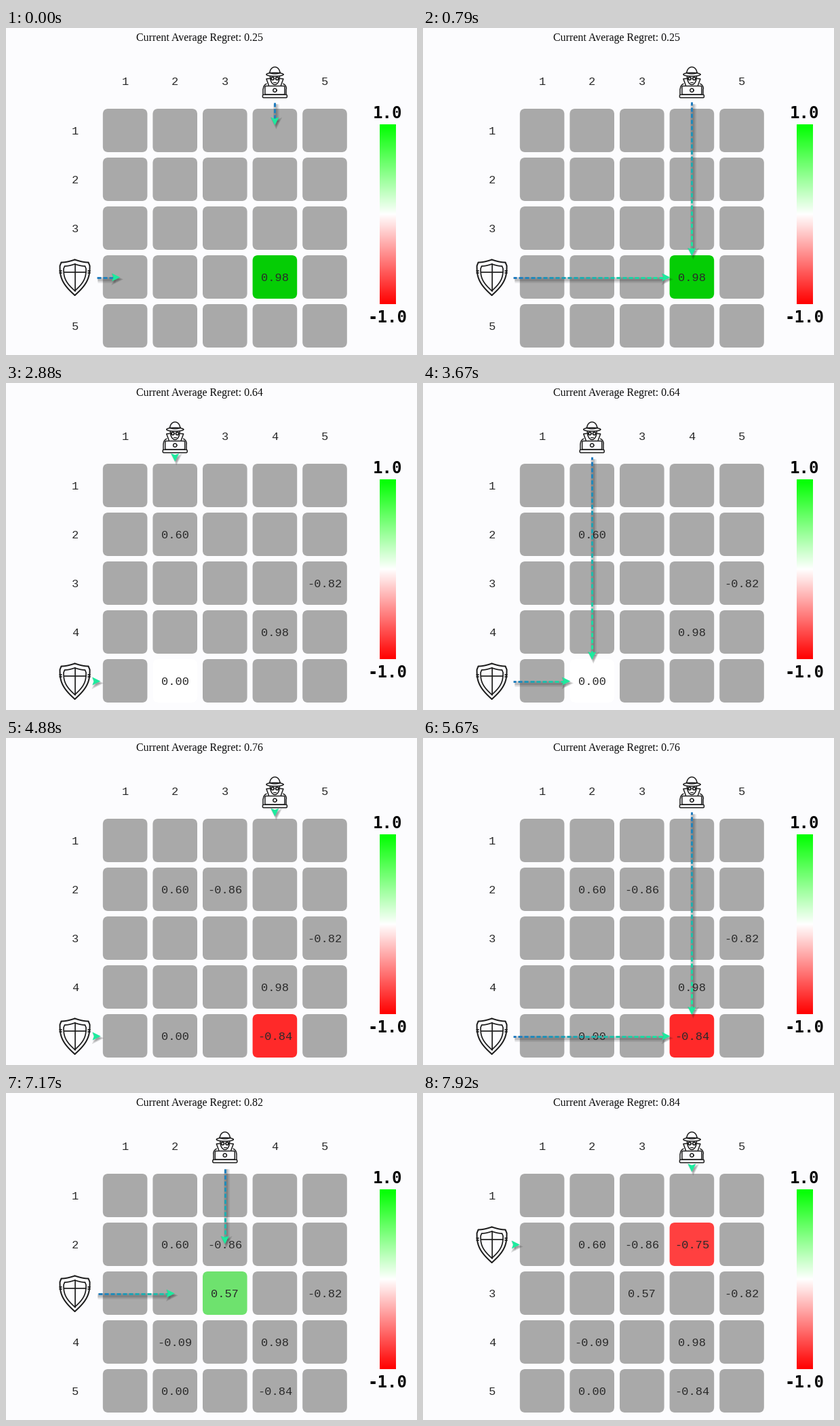
These frames come from a looping animation (606x482 px, 8 s). A matplotlib script:

```python
import numpy as np
import matplotlib.pyplot as plt
from matplotlib.animation import FuncAnimation
from matplotlib.collections import LineCollection
from matplotlib.patches import FancyBboxPatch, Polygon
from matplotlib.transforms import Affine2D

W, H, DPI = 606, 482, 64
PX = 72 / DPI                      # points per pixel
STEP, LOOP = 40, 8000
ROUND, LEAD, GROW = 1001, 148, 500  # ms: round length, head start, arrow growth

BACK, GREY, INK, ICON, SHADE = "#fcfcfe", "#a9a9a9", "#2a2a2a", "#1c1c1c", "#202020"
TAIL, HEAD = np.array([.13, .48, .75]), np.array([.11, .92, .62])

# row, column, payoff
PLAYS = [(4, 4, .98), (2, 2, .60), (3, 5, -.82), (5, 2, 0), (2, 3, -.86),
         (5, 4, -.84), (4, 2, -.09), (3, 3, .57), (2, 4, -.75)]


def shade(v, green=1.0):
    """White at 0, red at -1, green at +1."""
    return (1, 1 + v, 1 + v) if v < 0 else (1 - v, 1 - v * (1 - green), 1 - v)


def average_regret(n):
    return .25 if n <= 2 else 1 - 1.45 / n


def col_x(c):
    return 102 + 73.6 * c


def row_y(r):
    return 79 + 72 * r


def ease(p):
    """Cubic Bezier (.58, 0, .42, 1)."""
    s = np.linspace(0, 1, 200)
    x = 3 * (1 - s) * s * (.58 * (1 - s) + .42 * s) + s ** 3
    return np.interp(p, x, s * s * (3 - 2 * s))


fig = plt.figure(figsize=(W / DPI, H / DPI), dpi=DPI, facecolor=BACK)
ax = fig.add_axes([0, 0, 1, 1])
ax.axis("off")


def text(x, y, s, size=17, font="Liberation Mono", color=INK, **kw):
    kw.setdefault("ha", "center")
    return ax.text(x, y, s, fontsize=size * PX, family=font, color=color,
                   va="baseline", **kw)


def box(cx, cy, w, h, r, **kw):
    return ax.add_patch(FancyBboxPatch(
        (cx - w / 2, cy - h / 2), w, h,
        boxstyle=f"round,pad=0,rounding_size={r}", **kw))


def arc(cx, cy, rx, ry, a0=0, a1=360):
    a = np.radians(np.linspace(a0, a1, 40))
    return np.c_[cx + rx * np.cos(a), cy + ry * np.sin(a)]


def stroke(tr, pts, lw=1.5, mirror=False):
    for side in (1, -1) if mirror else (1,):
        x, y = np.array(pts).T
        ax.plot(x * side, y, color=ICON, lw=lw * PX, transform=tr, zorder=4,
                solid_capstyle="round", solid_joinstyle="round")


def draw_shield(tr):
    # half outline: dipped top edge, shoulder, flank curving to the tip
    u = np.linspace(0, 1, 20)
    top = np.c_[20 * u, -26 + 4 * np.sin(np.pi * u / 2)]
    flank = np.c_[22 * np.cos(np.pi / 2 * u ** 1.4), -17 + 43.5 * u]
    half = np.r_[top, flank]
    stroke(tr, half, 2, mirror=True)
    stroke(tr, half * .75, 1.7, mirror=True)
    stroke(tr, [(0, -19.5), (0, 20)], 1.7)
    stroke(tr, [(-16, -7.5), (16, -7.5)], 1.7)
    for y in (-10, -6.5):
        stroke(tr, [(19.5, y), (22.5, y)], 1.7, mirror=True)


def draw_spy(tr):
    outline = dict(fc="none", ec=ICON, lw=1.5 * PX, transform=tr, zorder=4)
    stroke(tr, arc(0, -13, 7.5, 9, 180, 360))             # hat
    stroke(tr, arc(0, -14, 8, 2, 0, 180))
    stroke(tr, arc(0, -11, 12.5, 2.6))
    stroke(tr, arc(0, -8, 7, 12, 0, 180))                 # face
    stroke(tr, arc(3.4, -5, 2.2, 2), 1.8, mirror=True)
    stroke(tr, [(-2, 0), (2, 0)], 1.2)
    stroke(tr, [(8, -5), (12.5, -4.5), (9, 5)], mirror=True)
    stroke(tr, arc(9, 10, 8, 8, -65, 0), mirror=True)     # shoulders
    stroke(tr, [(17, 10), (17, 18)], mirror=True)
    box(0, 12.3, 29, 12.6, 1.5, **outline)                # laptop
    box(0, 21, 36, 4.4, 1.5, **outline)
    stroke(tr, arc(0, 12.3, 2.6, 2.6))


class Arrow:
    """Dashed gradient arrow with a soft shadow, growing from its tail."""
    SIZE = 3
    DASH, PERIOD = 2 * SIZE, 3 * SIZE
    SHAPE = SIZE * np.array([(-2, -2), (2, 0), (-2, 2), (-1.25, 0)])

    def __init__(self, down):
        self.down = down
        self.blur = [(ax.plot([], [], color=SHADE, alpha=.1, lw=self.SIZE * k * PX,
                              solid_capstyle="butt", zorder=5)[0],
                      ax.add_patch(Polygon(self.SHAPE, fc=SHADE, ec="none",
                                           alpha=.16, zorder=5)),
                      .25 + .4 * k) for k in (1, 2, 3)]
        self.line = ax.add_collection(LineCollection(
            [], linewidths=self.SIZE * PX, capstyle="butt", zorder=6))
        self.head = ax.add_patch(Polygon(self.SHAPE, fc=HEAD, ec="none", zorder=7))

    def place(self, pts):
        pts = np.asarray(pts, float)
        return pts[:, ::-1] if self.down else pts

    def update(self, start, edge, across, grow, phase):
        full = edge - 2 * self.SIZE - start
        mid = start + grow * full
        stop = max(start, mid - self.SIZE)
        first = start + self.PERIOD * (phase - 1)
        lo = np.arange(first, max(stop, first + 1), self.PERIOD)
        hi = np.clip(lo + self.DASH, start, stop)
        lo = np.clip(lo, start, stop)
        self.line.set_segments([self.place([(a, across), (b, across)])
                                for a, b in zip(lo, hi)])
        f = ((lo + hi) / 2 - start) / full
        self.line.set_color(TAIL + f[:, None] * (HEAD - TAIL))
        self.head.set_xy(self.place(self.SHAPE + (mid, across)))
        shift = np.array((2, 3))
        shaft = self.place([(start, across), (stop, across)]) + shift
        for line, tip, k in self.blur:
            line.set_data(*shaft.T)
            tip.set_xy(self.place(self.SHAPE * k + (mid, across)) + shift)


# colour scale
scale = np.array([[shade(v)] for v in np.linspace(1, -1, 265)])
ax.imshow(scale, extent=(551, 575, 407, 142), aspect="auto", interpolation="nearest")
ax.set(xlim=(0, W), ylim=(H, 0))
for label, y in (("1.0", 133), ("-1.0", 434)):
    text(562.5, y, label, 24, "DejaVu Sans Mono", "#050505", weight="bold")

title = text(192, 19, "", 16, "Liberation Serif", "#080808", ha="left")

span = range(1, 6)
cells = {(r, c): box(col_x(c), row_y(r), 65.6, 64, 8, ec="none")
         for r in span for c in span}
values = [text(col_x(c), row_y(r) + 6, f"{v:.2f}") for r, c, v in PLAYS]
row_labels = {r: text(102, row_y(r) + 6, str(r)) for r in span}
col_labels = {c: text(col_x(c), 84.5, str(c)) for c in span}

shield_pos, spy_pos = Affine2D(), Affine2D()
draw_shield(shield_pos + ax.transData)
draw_spy(spy_pos + ax.transData)
across, down = Arrow(False), Arrow(True)


def draw(i):
    k, age = divmod(i * STEP + LEAD, ROUND)
    row, col, payoff = PLAYS[k]
    title.set_text(f"Current Average Regret: {average_regret(k + 1):.2f}")

    for key, cell in cells.items():
        cell.set_facecolor(shade(payoff, .8) if key == (row, col) else GREY)
    for n, val in enumerate(values):
        val.set_visible(n <= k)
    for r, label in row_labels.items():
        label.set_visible(r != row)
    for c, label in col_labels.items():
        label.set_visible(c != col)

    x, y = col_x(col), row_y(row)
    shield_pos.clear().translate(101.5, y + .5)
    spy_pos.clear().translate(x, 79.5)

    grow, phase = ease(age / GROW), age / 1000 % 1
    across.update(133, x - 32, y + .5, grow, phase)
    down.update(109, y - 31, x, grow, phase)
    return []


anim = FuncAnimation(fig, draw, frames=LOOP // STEP, interval=STEP,
                     init_func=lambda: draw(0), repeat=True, repeat_delay=0,
                     blit=False)
plt.show()
```
